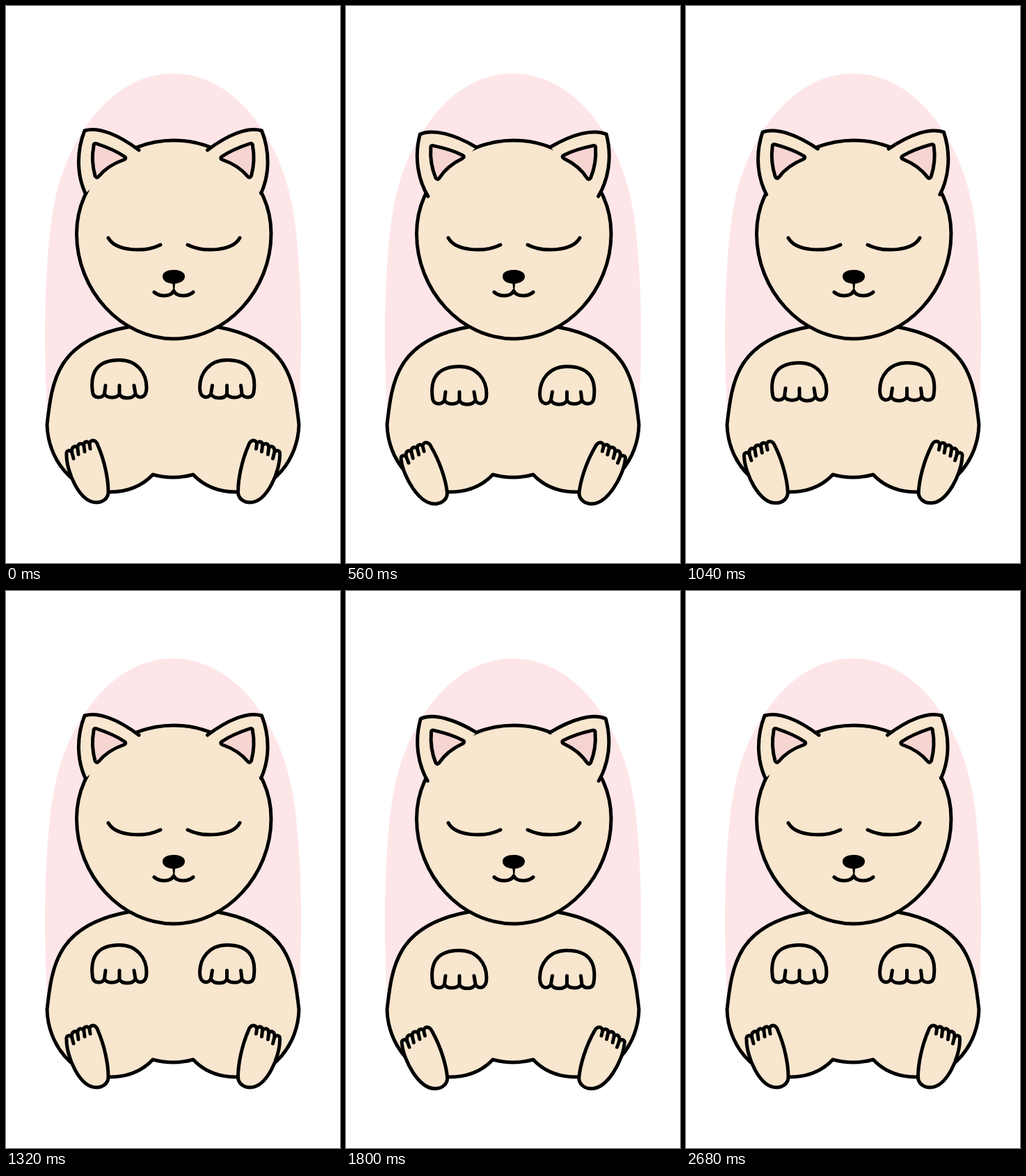
Animation of 480x800 px, one loop 4000 ms. Source, as an HTML page:

```html
<!DOCTYPE html>
<html lang="en">
<head>
<meta charset="utf-8">
<title>Sleeping cat</title>
<style>
  html, body { margin: 0; width: 100%; height: 100%; overflow: hidden; background: #fff; }
  svg { display: block; width: 100%; height: 100%; }
  .line { fill: none; stroke: #000; stroke-width: 5; stroke-linecap: round; stroke-linejoin: round; }
  .fur { fill: #f8e6cf; }
  .pink { fill: #f5d4d1; }
</style>
</head>
<body>
<svg viewBox="0 0 480 800">
  <path fill="#fee6e8" d="M60 600C52 480 56 350 70 280C90 185 154 97 239 97C327 97 390 185 410 280C424 350 428 480 420 600Z"/>
  <path class="line fur" d="M59 601C66 540 72 480 176 461C200 456 280 456 304 461C408 480 414 540 421 601C420 650 385 698 331 698C305 698 285 690 269 673Q240 681 211 673C195 690 175 698 149 698C95 698 60 650 59 601Z"/>
  <path class="line fur" d="M241 193C166 193 101.500 250 101.500 327C101.500 408 165 478 241 478C317 478 381 408 381 327C381 250 316 193 241 193Z"/>
  <path class="line" d="M147 333C158 353 200 354 222 343M336 333C325 353 283 354 261 343"/>
  <path d="M225 388C225 376 257 376 257 388C257 396 249 398 243 399L242 410H240.500L239.500 399C233 398 225 396 225 388Z"/>
  <path class="line" d="M213 411C221 418 237 418 241 409C245 418 261 418 269 411"/>

  <g id="side">
    <g id="ear">
      <path class="line fur" d="M114 269C103 245 100 212 113 179C133 173 162 185 191 207"/>
      <path class="line pink" d="M126 201Q126 196 131 198Q155 206 170 216Q174 219 169 221Q146 229 133 245Q130 248 128 244Q122 222 126 201Z"/>
    </g>
    <path id="paw" class="line" d="M143 545L141.500 557C138 564 126 564 124.500 555C120 524 133 508.500 163 508.500C188 508.500 202 527 202 548C202 565 189 564 186 557L184 545M186 557C182 565 166 565 163 557V545M163 557C160 564 145 564 141.500 557"/>
    <path id="foot" class="line fur" d="M87 645C86 637 93 637 95 642l2 8M95 642C93 632 101 630 103 636l1 8M103 636C102 627 110 627 112 632l1 8M112 632C111 625 118 624 120 629l1 7M120 629C121 622 129 622 132 631C142 654 147 680 147 698C147 708 138 713 130 713C105 713 87 668 87 645"/>
  </g>
  <use href="#side" transform="translate(480.500) scale(-1 1)"/>
</svg>
<script>
  const LOOP = 4000, STEP = 40, BREATH = 4000 / 3;
  const move = (id, value) => document.getElementById(id).setAttribute("transform", value);

  // Two breaths, then a rest until the loop ends.
  function draw(now) {
    const t = Math.floor(now % LOOP / STEP) * STEP;
    const k = t < 2 * BREATH ? (1 - Math.cos(2 * Math.PI * t / BREATH)) / 2 : 0;
    move("ear", `rotate(${-7.2 * k} 153 238)`);
    move("paw", `translate(0 ${9.8 * k})`);
    move("foot", `rotate(${-7.3 * k} 146 712)`);
  }

  const start = performance.now();
  function tick() {
    draw(performance.now() - start);
    requestAnimationFrame(tick);
  }
  tick();
</script>
</body>
</html>
```
